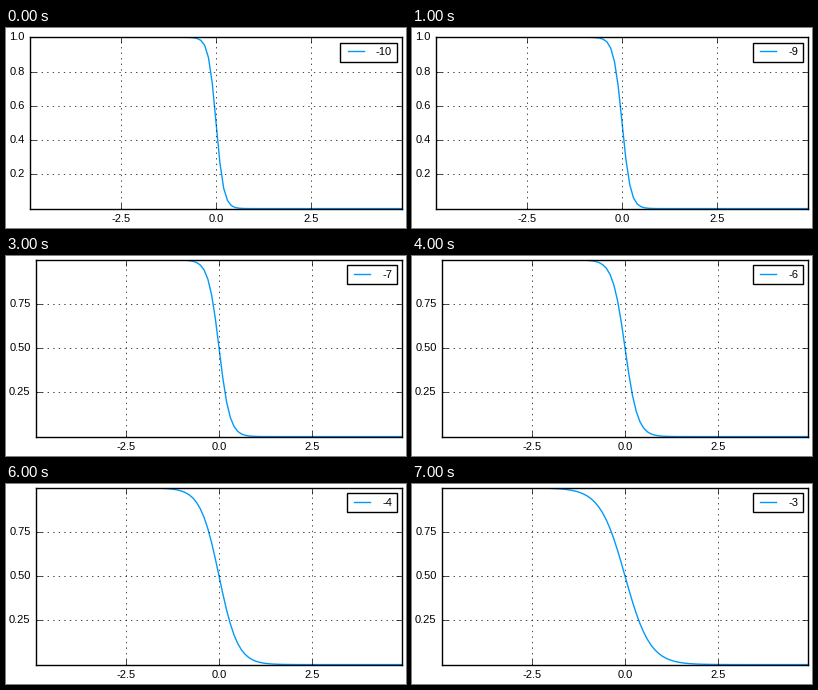
Recreate the animation shown at these times as a matplotlib script. Size 400 by 200 pixels, loop 8000 ms.

```python
import numpy as np
import matplotlib.pyplot as plt
from matplotlib.animation import FuncAnimation

W, H, DPI = 400, 200, 100
BLUE = "#009afa"
RIGHT, BOTTOM = 396.06, 180.6
WEIGHTS = list(range(-10, -2))

plt.style.use("classic")
plt.rcParams["font.family"] = "Liberation Sans"
plt.rcParams["font.size"] = 8

fig = plt.figure(figsize=(W / DPI, H / DPI), dpi=DPI, facecolor="white")
x = np.linspace(-4.9, 4.9, 99)


def sigmoid(z):
    return 1 / (1 + np.exp(-z))


def make_axes(left, top, yticks, fmt):
    """Axes with pixel edges measured from the top left corner."""
    ax = fig.add_axes([left / W, 1 - BOTTOM / H,
                       (RIGHT - left) / W, (BOTTOM - top) / H])
    ax.set_xlim(-4.9, 4.9)
    ax.set_ylim(0, 1)
    xticks = [-2.5, 0, 2.5]
    ax.set_xticks(xticks, [f"{t:.1f}" for t in xticks])
    ax.set_yticks(yticks, [format(t, fmt) for t in yticks])
    ax.tick_params(labelsize=8)
    ax.grid(True)
    return ax


def draw(i):
    fig.clear()
    w = WEIGHTS[i]
    # The y axis switches to coarser ticks once the curve stays below 1.
    if w < -7:
        ax = make_axes(24.1, 9.3, [0.2, 0.4, 0.6, 0.8, 1.0], ".1f")
    else:
        ax = make_axes(30.1, 3.94, [0.25, 0.5, 0.75], ".2f")
    ax.plot(x, sigmoid(w * x), color=BLUE, lw=1, label=str(w))
    ax.legend(loc="upper right", fontsize=8)
    return []


anim = FuncAnimation(fig, draw, frames=len(WEIGHTS), interval=1000,
                     init_func=lambda: draw(0), repeat=True, repeat_delay=0)
plt.show()
```
